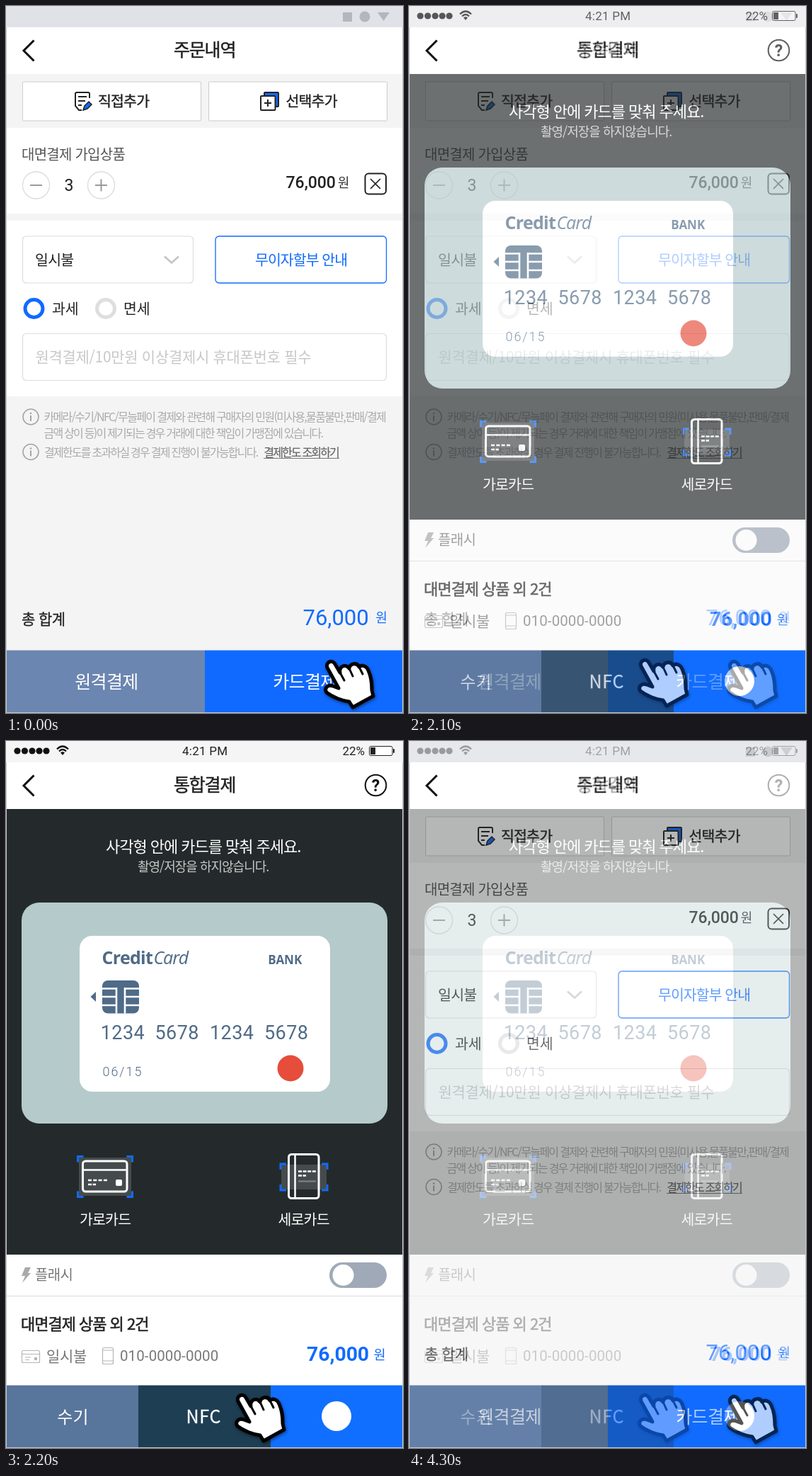
Recreate the animation shown at these times as an HTML page. Size 561x998 px, loop 4400 ms.

```html
<!DOCTYPE html>
<html lang="ko">
<head>
<meta charset="utf-8">
<title>Payment flow</title>
<style>
html, body { margin: 0; width: 100%; height: 100%; overflow: hidden; background: #fff; }
svg { display: block; width: 561px; height: 998px; }
.kr { font-family: "Noto Sans CJK KR", "Noto Sans CJK", "Noto Sans", sans-serif; }
.ro { font-family: Roboto, sans-serif; }
.os { font-family: "Open Sans", sans-serif; }
.hand { filter: drop-shadow(1px 2px 2px rgba(0, 0, 0, .45)); }
</style>
</head>
<body>
<svg id="stage" viewBox="0 0 561 998" xmlns="http://www.w3.org/2000/svg"></svg>
<script>
const BLUE = '#116aff', INK = '#222', NAVY = '#4f6b87', GRAY = '#f4f4f4';

// Text: ls = letter spacing, fat = extra outline for medium weights
const text = (s, x, y, size, fill, { ls = 0, fat = 0, w = 400, f = 'kr', more = '' } = {}) =>
  `<text class="${f}" x="${x}" y="${y}" font-size="${size}" font-weight="${w}" fill="${fill}" letter-spacing="${ls}"` +
  (fat ? ` stroke="${fill}" stroke-width="${fat}"` : '') + ` ${more}>${s}</text>`;
const box = (x1, y1, x2, y2, fill, rx = 0, stroke = 'none', sw = 1) =>
  `<rect x="${x1}" y="${y1}" width="${x2 - x1}" height="${y2 - y1}" rx="${rx}" fill="${fill}" stroke="${stroke}" stroke-width="${sw}"/>`;
const dot = (x, y, r, fill, stroke = 'none', sw = 1) =>
  `<circle cx="${x}" cy="${y}" r="${r}" fill="${fill}" stroke="${stroke}" stroke-width="${sw}"/>`;
const line = (d, stroke, sw = 2, fill = 'none', more = '') =>
  `<path d="${d}" fill="${fill}" stroke="${stroke}" stroke-width="${sw}" ${more}/>`;
const shape = (d, fill) => `<path d="${d}" fill="${fill}"/>`;

const header = (title, bar) =>
  box(0, 0, 561, 30, bar) + box(0, 30, 561, 96, '#fff') +
  line('M39.5 48.5L25 63L39.5 77.5', '#111', 3) +
  text(title, 237, 71, 25, INK, { ls: -1.2, fat: .5 });

const hand = (dx, dy) => `<g class="hand" transform="translate(${dx} ${dy})" stroke-linejoin="round" stroke-linecap="round">` +
  line('M454 934C451 926 461 922 465 929L472 941C470 932 480 928 485 935C486 928 496 926 499 933' +
    'C503 929 510 932 512 938C517 949 517 958 517 966L519 974L490 990L485 982C476 981 462 976 453 969' +
    'C449 963 455 957 462 960L470 963Z', '#000', 5, '#fff') +
  line('M472 941L478 952M485 935L490 946M499 933L504 943', '#000', 3) + '</g>';

const info = y => dot(35, y, 11, 'none', '#a5a5a5', 1.6) + dot(35, y - 5, 1.3, '#a5a5a5') +
  line(`M35 ${y - 2}V${y + 6}`, '#a5a5a5', 2);

const corners = (x1, y1, x2, y2, k = 8) => line(
  `M${x1} ${y1 + k}V${y1}H${x1 + k}M${x2 - k} ${y1}H${x2}V${y1 + k}` +
  `M${x2} ${y2 - k}V${y2}H${x2 - k}M${x1 + k} ${y2}H${x1}V${y2 - k}`, BLUE, 3);

function orderScreen() {
  const note = { ls: -1.76 }, add = { ls: -.8, fat: .4 };
  const edge = '#dcdcdc', pale = '#aaa';
  return box(0, 0, 561, 998, GRAY) + header('주문내역', '#e1e2e7') +
    box(476, 9, 489, 22, '#b4b5bd') + dot(507, 15, 7.5, '#b4b5bd') + shape('M525 9H542L533.5 21Z', '#b4b5bd') +
    // add buttons
    box(23.5, 107, 275.5, 162, '#fff', 1, '#ccc') + box(286.5, 107, 538.5, 162, '#fff', 1, '#ccc') +
    line('M118 130V124Q118 122 116 122H100Q98 122 98 124V141L103 147H107M102 128H114M102 134H112M102 140H107', INK, 2) +
    line('M109 147L111 141L117 135L121 139L115 145Z', INK, 1.5, BLUE) +
    text('직접추가', 130, 141.6, 20.5, INK, add) +
    box(365, 122, 385, 142, BLUE, 1, INK, 2) + box(360, 127, 380.5, 147, '#fff', 1, INK, 2) +
    line('M370 132V142M365 137H375', INK) +
    text('선택추가', 395.5, 141.6, 20.5, INK, add) +
    // item
    box(0, 172, 561, 293, '#fff') +
    text('대면결제 가입상품', 22, 216.5, 20, '#555', { ls: -.75 }) +
    dot(42.5, 253, 19, '#fff', edge, 1.3) + line('M34 253H51', '#999') +
    text('3', 82.5, 261, 23, INK, { f: 'ro' }) +
    dot(134.5, 253, 19, '#fff', edge, 1.3) + line('M126 253H143M134.5 244.5V261.5', '#999') +
    text('76,000', 395.5, 257, 23, INK, { f: 'ro', w: 500 }) + text('원', 468.8, 256, 18, '#333') +
    box(507.5, 236.5, 537, 265.5, '#fff', 5, INK, 2) + line('M515 244L529 258M529 244L515 258', INK, 1.7) +
    // options
    box(0, 303, 561, 551, '#fff') +
    box(23.5, 325, 264.5, 391, '#fff', 5, edge, 1.2) + text('일시불', 41, 366, 20.5, INK, { ls: -.7 }) +
    line('M224 353.5L234 362.5L244 353.5', '#c4c4c4', 2.5) +
    box(296, 325, 537.5, 391, '#fff', 5, BLUE, 1.3) +
    text('무이자할부 안내', 352, 366, 20.5, BLUE, { ls: -.95 }) +
    dot(39.5, 427, 12.5, '#fff', BLUE, 5) + text('과세', 65, 434.6, 20.5, INK) +
    dot(141, 427, 12.5, '#fff', '#dedede', 5) + text('면세', 166, 434.6, 20.5, INK) +
    box(23.5, 462.5, 537.5, 528.5, '#fff', 5, edge, 1.2) +
    text('원격결제/10만원 이상결제시 휴대폰번호 필수', 41.5, 502.5, 21, '#c8c8c8', { ls: -.3 }) +
    // notes
    info(580) + info(629.5) +
    text('카메라/수기/NFC/무늘페이 결제와 관련해 구매자의 민원(미사용,물품불만,판매/결제', 53.5, 586, 16, pale, { ls: -1.66 }) +
    text('금액 상이 등)이 제기되는 경우 거래에 대한 책임이 가맹점에 있습니다.', 53.5, 608.5, 16, pale, note) +
    text('결제한도를 초과하실 경우 결제 진행이 불가능합니다.', 54, 635.5, 16, pale, note) +
    text('결제한도 조회하기', 364.3, 635.5, 16, '#666', { ls: -1.85, fat: .2 }) +
    line('M364 638.5H471', '#777', 1) +
    // total
    text('총 합계', 22, 873, 21, INK, { ls: -.6, fat: .3 }) +
    text('76,000', 419.5, 874, 31, BLUE, { f: 'ro' }) + text('원', 522.3, 870, 18, BLUE) +
    box(0, 909.5, 281, 998, '#6b86b0') + box(281, 909.5, 561, 998, BLUE) +
    text('원격결제', 97.3, 963, 25, '#fff', { ls: -.7 }) + text('카드결제', 377.3, 963, 25, '#fff', { ls: -.7 }) +
    hand(0, 0);
}

function scanScreen() {
  const soft = '#777', num = { f: 'ro', ls: .4 };
  const dots = [16, 26.5, 37, 47, 57].map(x => dot(x, 14, 4.6, '#111')).join('');
  const digits = [['1234', 133.8], ['5678', 210.5], ['1234', 288], ['5678', 365]]
    .map(([s, x]) => text(s, x, 421, 27, NAVY, num)).join('');
  return box(0, 0, 561, 998, '#fff') + header('통합결제', '#f5f5f5') + dots +
    line('M72 11.5Q80 3.5 88 11.5M75 14.5Q80 9.5 85 14.5', '#111', 2.3) + shape('M77 16.5Q80 14 83 16.5L80 20Z', '#111') +
    text('4:21 PM', 249, 20, 17, INK, { f: 'ro', ls: .25 }) + text('22%', 475.5, 20, 17, INK, { f: 'ro' }) +
    box(513.5, 7.5, 546, 20.5, '#fff', 2, INK, 1) + box(515, 9, 522, 19, INK) + box(547, 11, 549, 17, INK, 1) +
    dot(522.5, 62.5, 14.8, '#fff', '#111', 2) +
    text('?', 522.5, 71, 23, '#111', { f: 'ro', w: 700, more: 'text-anchor="middle"' }) +
    // camera view
    box(0, 96, 561, 725, '#242a2b') +
    text('사각형 안에 카드를 맞춰 주세요.', 141, 157, 22, '#fff', { ls: -1.03 }) +
    text('촬영/저장을 하지않습니다.', 186, 183.5, 18, '#c8c8c8', { ls: -1 }) +
    box(22, 228, 539, 540, '#b5cacb', 25) + box(104, 275, 458, 495, '#fff', 18) +
    text('Credit', 135.5, 315, 25, NAVY, { f: 'os', w: 700, ls: -.7 }) +
    text('Card', 208.5, 315, 25, NAVY, { f: 'os', ls: -1, more: 'font-style="italic"' }) +
    text('BANK', 370.3, 315, 17, NAVY, { f: 'os', w: 700 }) +
    shape('M127 354V368L119.5 361Z', NAVY) + box(136, 338, 188, 384.5, NAVY, 8) +
    line('M136 349.5H156M136 361H156M136 373H156M168 349.5H188M168 361H188M168 373H188M156 348V384.5M168 348V384.5', '#fff', 2.6) +
    digits + text('06/15', 136.5, 472.5, 18, NAVY, { f: 'ro', w: 300, ls: 1.95 }) +
    dot(402, 462, 18.5, '#e64d3b') +
    // card direction
    box(103, 588, 177, 642, '#454b4d') + corners(101.5, 586.5, 178.5, 643.5) +
    box(108.5, 593, 171, 636, 'none', 4, '#fff', 3) + line('M108.5 605.5H171', '#fff', 2.5) +
    line('M116 620H143', '#fff', 2.5, 'none', 'stroke-dasharray="5 2.3"') +
    line('M116 626H127', '#fff', 2.5, 'none', 'stroke-dasharray="5 1.5"') + box(155, 619, 164, 628, '#fff', 2) +
    box(389, 598, 453, 633, '#454b4d') + corners(388, 597, 454, 634) +
    box(399.5, 583.5, 442, 645.5, 'none', 4, '#fff', 3) + line('M408.5 583.5V645.5', '#fff', 2.5) +
    line('M413 607.5H438', '#fff', 2.5, 'none', 'stroke-dasharray="5 1.6"') +
    line('M413 613.5H424', '#fff', 2.5, 'none', 'stroke-dasharray="5 1.5"') + line('M413 621.5H438', '#777c7e', 2.5) +
    text('가로카드', 104, 683, 20.5, '#fff', { ls: -.8 }) + text('세로카드', 384.5, 683, 20.5, '#fff', { ls: -.8 }) +
    // flash
    shape('M27 743H35L31 751H35L23 765L27 755H22Z', '#aaa') + text('플래시', 41, 761, 20, soft, { ls: -.6 }) +
    box(457, 736, 538, 772, '#a0a9b8', 18) + dot(476.5, 754, 15, '#fff') + line('M0 783.5H561', '#dcdcdc', 1) +
    // summary
    text('대면결제 상품 외 2건', 21, 831, 22, INK, { ls: -1.02, fat: .55 }) +
    box(22.5, 860.5, 47.5, 877.5, '#fff', 2, '#b5b5b5', 1.2) + line('M22.5 865.5H47.5M27 870H35M27 873.5H33', '#b5b5b5', 1.2) +
    box(40, 870, 44, 874, '#b5b5b5') + text('일시불', 57, 875.5, 21, soft, { ls: -.3 }) +
    box(136.5, 856.5, 151.5, 879.5, '#fff', 2, '#b5b5b5', 1.2) + line('M136.5 860H151.5M136.5 875H151.5', '#b5b5b5', 1) +
    text('010-0000-0000', 161, 875, 20.5, soft, { f: 'ro', ls: .1 }) +
    text('76,000', 425, 875, 28.3, BLUE, { f: 'ro', w: 700 }) + text('원', 519.5, 873, 18.5, BLUE) +
    box(0, 909.5, 187, 998, '#58759c') + box(187, 909.5, 374, 998, '#1e3e54') + box(374, 909.5, 561, 998, '#116fff') +
    text('수기', 72.3, 963, 24, '#fff') + text('NFC', 254.5, 963, 25, '#fff', { ls: .7, fat: .3 }) +
    dot(467, 953, 21, '#fff') + hand(-126, -2);
}

const stage = document.getElementById('stage');
stage.innerHTML = `<g>${orderScreen()}</g><g id="scan">${scanScreen()}</g>` +
  line('M.5 30V997.5H560.5V30', '#c6c9d3', 1);
const scan = document.getElementById('scan');

// The crossfade moves in hard steps of a third
function fade(t) {
  if (t < 2000) return 0;
  if (t < 2200) return t < 2100 ? 1 / 3 : 2 / 3;
  if (t < 4200) return 1;
  return t < 4300 ? 2 / 3 : 1 / 3;
}

let start;
function tick(now) {
  start ??= now;
  scan.setAttribute('opacity', fade((now - start) % 4400));
  requestAnimationFrame(tick);
}
scan.setAttribute('opacity', 0);
requestAnimationFrame(tick);
</script>
</body>
</html>
```
